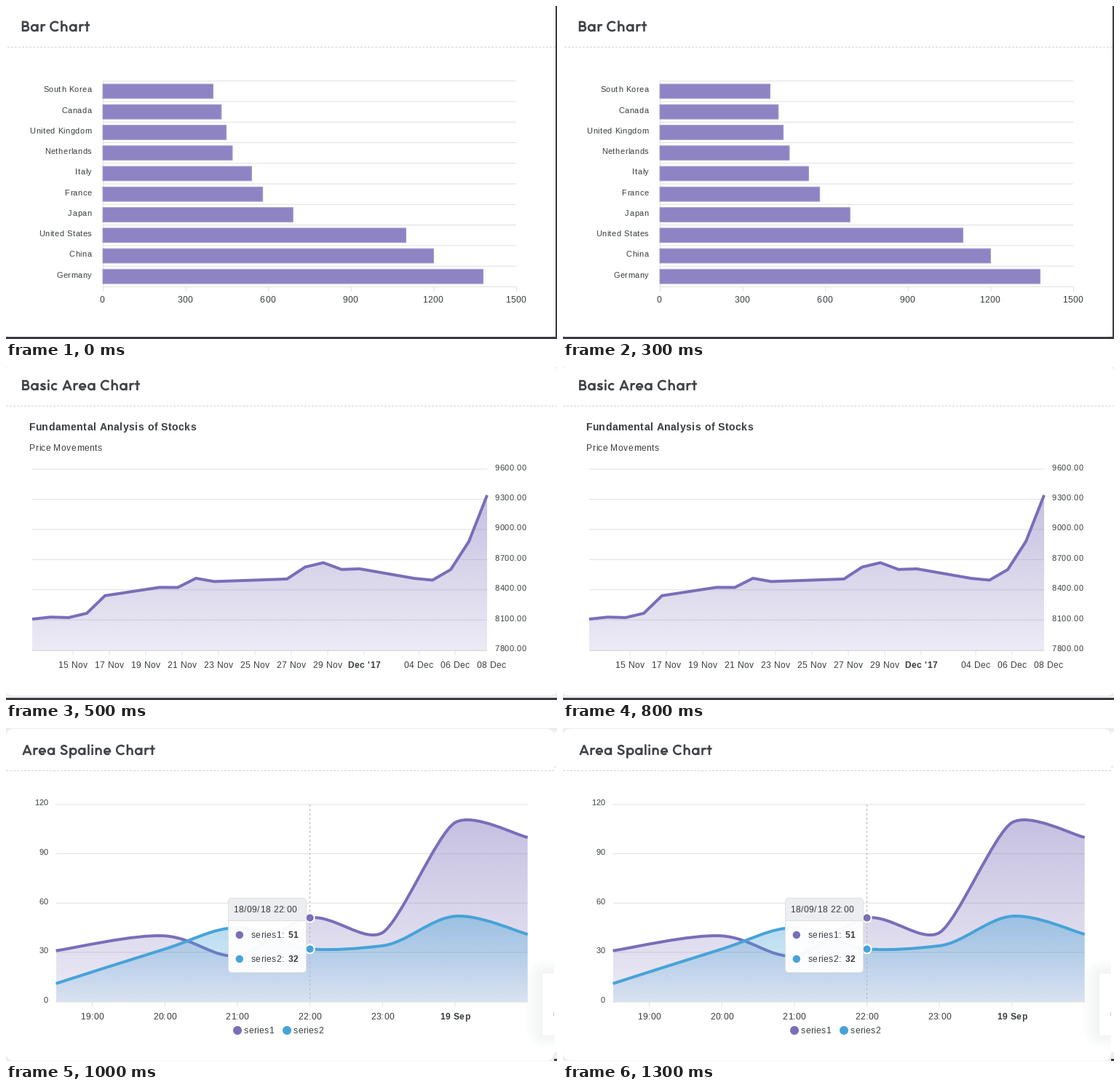
Recreate the animation shown at these times as a matplotlib script. Size 757 by 457 pixels, loop 1.5 s.

```python
import numpy as np
import matplotlib.pyplot as plt
from matplotlib.animation import FuncAnimation
from matplotlib.patches import Circle, FancyBboxPatch, PathPatch, Rectangle
from matplotlib.path import Path

W, H, DPI = 757, 457, 64
PT = 72 / DPI  # points per pixel

BACK, DARK, INK, TITLE = "#eceef0", "#3a3b41", "#373d3f", "#3f4348"
GRID, DASH = "#e0e0e0", "#d3d5d8"
PURPLE, BLUE = "#7a6db9", "#46a3d8"

fig = plt.figure(figsize=(W / DPI, H / DPI), dpi=DPI, facecolor=BACK)
probe = fig.text(0, 0, "", family="Liberation Sans", fontsize=100 * PT)
advances = {}


def advance(ch, weight):
    """Advance width of one character in em."""
    if (ch, weight) not in advances:
        probe.set_weight(weight)
        widths = []
        for s in ("H" + ch + "H", "HH"):
            probe.set_text(s)
            widths.append(probe.get_window_extent().width)
        advances[ch, weight] = (widths[0] - widths[1]) / 100
    return advances[ch, weight]


def arc(cx, cy, rx, ry, a0, a1):
    t = np.radians(np.linspace(a0, a1, 40))
    return [*zip(cx + rx * np.cos(t), cy + ry * np.sin(t))]


def stem(x, y0, y1):
    return [(x, y0), (x, y1)]


def ring(cx, r=3.9, a0=0, a1=360):
    return arc(cx, 4.9, r, r, a0, a1)


ARCH = [(2.7, 4.5)] + arc(6, 5.3, 3.3, 3.5, 180, 0) + [(9.3, 0)]
SMALL_S = [(8, 7.6), (6.6, 8.5), (4.7, 8.7), (2.9, 8.1), (2.3, 7), (2.8, 5.9),
           (4.4, 5.2), (6.4, 4.5), (7.5, 3.5), (7.4, 2.2), (6.4, 1.4),
           (4.6, 1.1), (2.6, 1.6), (1.2, 2.7)]
BIG_S = [(9.9, 10.9), (8.5, 12.3), (6.4, 12.9), (4.1, 12.4), (2.8, 11.1),
         (2.8, 9.4), (4, 8.2), (6.2, 7.2), (8.6, 6.1), (9.8, 4.7), (9.7, 2.9),
         (8.3, 1.6), (6, 1.1), (3.5, 1.7), (1.6, 3.6)]

# Heading letters as pen strokes: advance width, strokes (baseline at y = 0).
GLYPHS = {
    " ": (5, []),
    "A": (14, [[(1.5, 0), (7, 13.3), (12.5, 0)], [(3.4, 3.8), (10.6, 3.8)]]),
    "B": (12.8, [stem(2.9, 0, 14),
                 [(2.9, 12.75)] + arc(7, 9.95, 2.8, 2.8, 90, -90) + [(2.9, 7.15)],
                 [(2.9, 7.15)] + arc(7.6, 4.2, 3.1, 2.95, 90, -90) + [(2.9, 1.25)]]),
    "C": (14, [arc(7.9, 7, 5.95, 5.95, 45, 315)]),
    "S": (12, [BIG_S]),
    "a": (12.6, [ring(5.8), stem(10, 0, 9.8)]),
    "c": (10.8, [ring(5.9, a0=45, a1=315)]),
    "e": (12, [ring(5.9, a1=318), [(2.2, 4.5), (11, 4.5)]]),
    "h": (12, [stem(2.7, 0, 14.6), ARCH]),
    "i": (5.2, [stem(2.6, 0, 9.8), stem(2.6, 11.6, 14.4)]),
    "l": (5.2, [stem(2.6, 0, 14.6)]),
    "n": (12, [stem(2.7, 0, 9.8), ARCH]),
    "p": (12.6, [stem(2.7, -4.6, 9.8), ring(6.9)]),
    "r": (8, [stem(2.7, 0, 9.8), arc(6.2, 5.1, 3.5, 3.6, 180, 62)]),
    "s": (9.6, [SMALL_S]),
    "t": (8, [stem(4.2, 0, 13.4), [(0.6, 8.6), (7.8, 8.6)]]),
}


def spline(pts):
    """Cubic path through pts with limited finite-difference tangents."""
    x, y = np.array(pts, float).T
    d = np.diff(y) / np.diff(x)
    m = np.r_[d[0], (d[1:] + d[:-1]) / 2, d[-1]]
    for i, slope in enumerate(d):
        s = np.hypot(m[i], m[i + 1]) / abs(slope)
        if s > 3:
            m[i:i + 2] *= 3 / s
    reach = np.r_[x[1:], x[-1]] - np.r_[x[0], x[:-1]]
    tx = reach / (6 * (1 + m ** 2))
    p, t = np.c_[x, y], np.c_[tx, m * tx]
    verts = [p[0]]
    for i in range(len(d)):
        verts += [p[i] + t[i], p[i + 1] - t[i + 1], p[i + 1]]
    return Path(verts, [Path.MOVETO] + [Path.CURVE4] * (3 * len(d)))


class Scene:
    """A full-stage layer in pixel units; later artists lie on top."""

    def __init__(self):
        self.ax = fig.add_axes([0, 0, 1, 1])
        self.ax.set_xlim(0, W)
        self.ax.set_ylim(H, 0)
        self.ax.axis("off")
        self.z = 0

    def top(self, artist):
        self.z += 1
        artist.set_zorder(self.z)
        artist.set_snap(False)
        return artist

    def rect(self, x0, y0, x1, y1, color, r=0, edge="none", alpha=None):
        style = dict(fc=color, ec=edge, lw=PT, alpha=alpha)
        if r:
            box = FancyBboxPatch((x0, y0), x1 - x0, y1 - y0,
                                 boxstyle=f"round,pad=0,rounding_size={r}", **style)
        else:
            box = Rectangle((x0, y0), x1 - x0, y1 - y0, **style)
        return self.top(self.ax.add_patch(box))

    def line(self, x0, y0, x1, y1, color=GRID, w=1, dash=None):
        self.top(self.ax.plot([x0, x1], [y0, y1], color=color, lw=w * PT,
                              ls=(0, dash) if dash else "-",
                              solid_capstyle="butt", dash_capstyle="butt")[0])

    def dot(self, x, y, r, color, edge="none", w=0):
        self.top(self.ax.add_patch(Circle((x, y), r, fc=color, ec=edge, lw=w * PT)))

    def stroke(self, path, color, w, join="miter"):
        self.top(self.ax.add_patch(PathPatch(
            path, fill=False, ec=color, lw=w * PT, capstyle="butt", joinstyle=join)))

    def text(self, x, y, s, size=12, ha="left", weight="normal", track=0.5):
        steps = [advance(ch, weight) * size + track for ch in s]
        x -= {"left": 0, "center": 0.5, "right": 1}[ha] * sum(steps)
        for ch, step in zip(s, steps):
            if ch != " ":
                self.top(self.ax.text(x, y, ch, family="Liberation Sans", color=INK,
                                      fontsize=size * PT, weight=weight,
                                      va="baseline", ha="left"))
            x += step

    def title(self, x, y, s, scale=1):
        for ch in s:
            width, strokes = GLYPHS[ch]
            for pts in strokes:
                path = Path(np.array(pts) * (scale, -scale) + (x, y))
                self.stroke(path, TITLE, 2.5 * scale, "bevel")
            x += width * scale

    def area(self, path, color, base, a0, a1):
        """Line with a vertical fade below it, from alpha a0 to a1."""
        (x0, y0), (x1, _) = path.vertices[0], path.vertices[-1]
        peak = path.get_extents().ymin
        fade = np.ones((128, 1, 4))
        fade[..., :3] = plt.matplotlib.colors.to_rgb(color)
        fade[:, 0, 3] = np.linspace(a0, a1, 128)
        codes = path.codes
        if codes is None:
            codes = [Path.MOVETO] + [Path.LINETO] * (len(path.vertices) - 1)
        shape = Path([*path.vertices, (x1, base), (x0, base), (x0, y0)],
                     [*codes, Path.LINETO, Path.LINETO, Path.LINETO])
        img = self.ax.imshow(fade, extent=(x0, x1, base, peak), aspect="auto",
                             interpolation="bilinear")
        img.set_clip_path(shape, self.ax.transData)
        self.top(img)
        self.stroke(path, color, 4)


def bar_chart():
    sc = Scene()
    sc.rect(-2, -3, 756, 455, "white", r=12)
    sc.rect(755, 0, W, H, DARK)
    sc.rect(0, 454, W, H, DARK)
    sc.title(20, 35, "Bar Chart", 1.025)
    sc.line(2, 56.5, 755, 56.5, DASH, dash=(3, 2))

    left, right, top, row = 133, 701, 102.9, 28.24
    for i in range(11):
        sc.line(left, top + i * row, right, top + i * row)
    sc.line(left + 0.5, top, left + 0.5, 385.5)
    data = [("South Korea", 400), ("Canada", 430), ("United Kingdom", 448),
            ("Netherlands", 470), ("Italy", 540), ("France", 580), ("Japan", 690),
            ("United States", 1100), ("China", 1200), ("Germany", 1380)]
    for i, (name, value) in enumerate(data):
        y = top + i * row
        end = left + value * (right - left) / 1500
        sc.rect(left, y + 0.15 * row, end, y + 0.85 * row, "#8e84c4", edge="#a39bd0")
        sc.text(117.8, y + 15.5, name, 11, "right")
    for i in range(6):
        x = left + i * 113.6
        sc.line(x + 0.5, 385.5, x + 0.5, 392)
        sc.text(x - 0.6, 407, str(300 * i), ha="center")
    return sc


def stock_chart():
    sc = Scene()
    sc.rect(-2, -2, 758, 451, "white", r=12)
    sc.rect(0, 454, W, H, DARK)
    sc.title(20.4, 32, "Basic Area Chart", 1.01)
    sc.line(0, 53.5, W, 53.5, DASH, dash=(3, 2))
    sc.text(31.3, 87, "Fundamental Analysis of Stocks", 14, weight="bold")
    sc.text(31.8, 115, "Price Movements")

    left, right, base, step = 36, 661, 388.5, 41.4
    for i in range(7):
        y = base - i * step
        sc.line(left, y, right, y)
        sc.text(671.6, y + 1.5, f"{7800 + 300 * i}.00", 11)
    sc.line(left, base + 0.5, right, base + 0.5, w=2)
    days = [0, 1, 2, 3, 4, 7, 8, 9, 10, 11, 14, 15, 16, 17, 18, 21, 22, 23, 24, 25]
    price = [8108, 8128, 8123, 8166, 8341, 8424, 8423, 8514, 8482, 8488,
             8507, 8626, 8669, 8602, 8608, 8513, 8496, 8601, 8881, 9341]
    pts = [(left + 25 * d, base - (p - 7800) * step / 300) for d, p in zip(days, price)]
    sc.area(Path(pts), PURPLE, base, 0.43, 0.14)

    marks = [(92 + 50 * i, f"{15 + 2 * i} Nov") for i in range(8)]
    marks += [(492, "Dec '17"), (567, "04 Dec"), (617, "06 Dec"), (667, "08 Dec")]
    for x, name in marks:
        if x < right:
            sc.line(x, base, x, base + 7)
        sc.text(x - 0.1, 413, name, ha="center",
                weight="bold" if "'" in name else "normal")
    return sc


def tooltip(sc):
    box = sc.rect(305.5, 233.5, 412.5, 335.5, "white", r=5, alpha=0.96)
    head = sc.rect(305.5, 233.5, 412.5, 265, "#eceef1", alpha=0.97)
    head.set_clip_path(box)
    sc.line(305.5, 264.5, 412.5, 264.5, "#dddddd")
    sc.rect(305.5, 233.5, 412.5, 335.5, "none", r=5, edge="#e0e0e0")
    sc.text(312.5, 253, "18/09/18 22:00")
    for y, color, name, value in ((284, PURPLE, "series1:", "51"),
                                  (317, BLUE, "series2:", "32")):
        sc.dot(320.8, y, 5.2, color)
        sc.text(336.3, y + 4, name)
        sc.text(387.3, y + 4, value, weight="bold")


def spline_chart():
    sc = Scene()
    sc.rect(0, 1, 753, 456.5, "white", r=12)
    sc.title(22, 37, "Area Spaline Chart")
    sc.line(0, 58.5, 753, 58.5, DASH, dash=(3, 2))

    left, right, base, hour = 68.6, 717, 375.5, 99.7
    unit = 270.5 / 120
    for v in range(0, 121, 30):
        y = base - v * unit
        sc.line(left, y, right, y)
        sc.text(58.6, y + 1.4, str(v), 11, "right")
    times = [0, 1.5, 2.5, 3.5, 4.5, 5.5, 6.5]
    for values, color, a0, a1 in (
            ([31, 40, 28, 51, 42, 109, 100], PURPLE, 0.43, 0.14),
            ([11, 32, 45, 32, 34, 52, 41], BLUE, 0.43, 0.12)):
        pts = [(left + t * hour, base - v * unit) for t, v in zip(times, values)]
        sc.area(spline(pts), color, base, a0, a1)
    sc.line(left, base + 0.5, right, base + 0.5)

    for i, name in enumerate(["19:00", "20:00", "21:00", "22:00", "23:00", "19 Sep"]):
        x = left + (i + 0.5) * hour
        sc.line(x, base, x, base + 7)
        sc.text(x, 400, name, ha="center", weight="bold" if i == 5 else "normal")
    sc.line(417.5, 105, 417.5, base, "#b6b6b6", dash=(3, 3))
    for v, color in ((51, PURPLE), (32, BLUE)):
        sc.dot(417.6, base - v * unit, 6, color, "white", 2)
    tooltip(sc)
    for x, color, name in ((318, PURPLE, "series1"), (386, BLUE, "series2")):
        sc.dot(x, 415, 6, color)
        sc.text(x + 8.5, 419, name)

    # soft shadow and edge of a floating panel
    for k in range(12):
        sc.rect(713 + 2 * k, 318 + 1.7 * k, 790, 440 - 1.7 * k, "#dfe5ea",
                r=34 - 2.5 * k, alpha=0.03)
    sc.rect(737, 337, 753, 422, "white", r=2)
    sc.line(752.5, 390, 752.5, 395, "#c4c8cc")

    # right margin beyond the card
    sc.rect(753, 0, W, H, BACK)
    sc.rect(753, 5, W, 445, "white")
    sc.rect(753, 53, 756, 54, DASH)
    sc.rect(753, 454, W, H, DARK)
    return sc


scenes = [bar_chart(), stock_chart(), spline_chart()]
probe.remove()


def show(i):
    for k, sc in enumerate(scenes):
        sc.ax.set_visible(k == i)
    return []


anim = FuncAnimation(fig, show, frames=3, interval=500, init_func=lambda: show(0),
                     repeat=True, repeat_delay=0)
plt.show()
```
